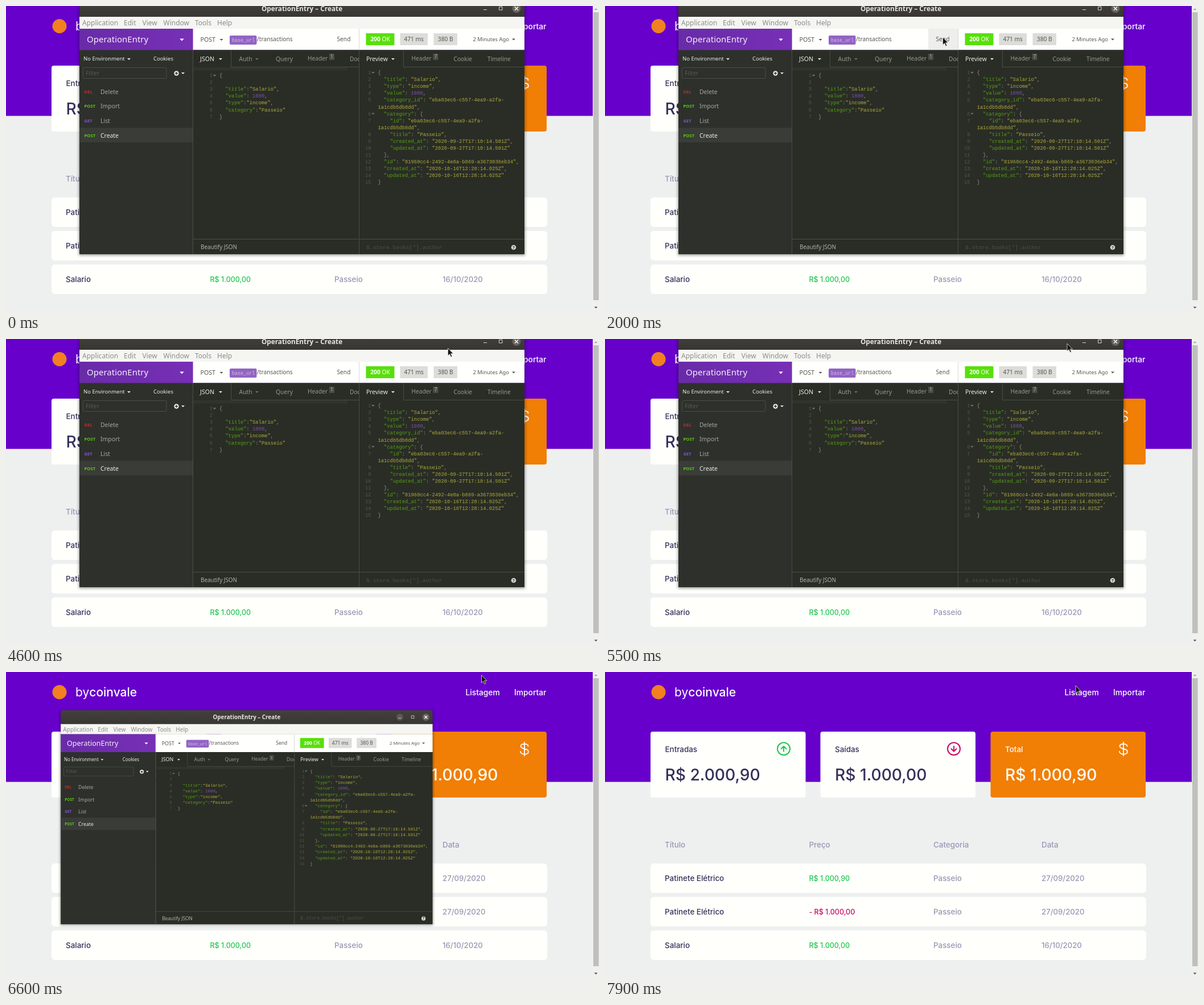
An HTML page that plays this animation: 1042x537 px, repeating every 8 s.

```html
<!DOCTYPE html>
<html lang="pt">
<head>
<meta charset="utf-8">
<title>Finance dashboard</title>
<style>
html, body { margin: 0; width: 100%; height: 100%; overflow: hidden; background: #eef0f0; }
svg { display: block; width: 1042px; height: 537px; }
text { white-space: pre; }
.page { font-family: Inter, "Open Sans", sans-serif; font-weight: 500; }
.ui { font-family: "Noto Sans", "Open Sans", sans-serif; }
.mono { font-family: "Liberation Mono", "DejaVu Sans Mono", monospace; }
</style>
</head>
<body>
<svg id="stage" viewBox="0 0 1042 537">
  <defs>
    <linearGradient id="bar" x1="0" y1="0" x2="0" y2="1">
      <stop offset="0" stop-color="#43413c"/><stop offset="1" stop-color="#373632"/>
    </linearGradient>
    <linearGradient id="brand">
      <stop offset="0" stop-color="#692ba8"/><stop offset="1" stop-color="#772fb6"/>
    </linearGradient>
    <filter id="soft" x="-5%" y="-5%" width="110%" height="112%"><feGaussianBlur stdDeviation="2.5"/></filter>
  </defs>
  <g id="page"></g>
  <g id="win"></g>
  <path id="cursor" d="M0 0V13.5L3.1 10.6L5.3 15.6L7.4 14.7L5.2 9.8H9.4Z" fill="#141414" stroke="#e4e4e4" stroke-width=".8"/>
</svg>
<script>
const $ = id => document.getElementById(id);

const rect = (x, y, w, h, fill, extra = '') =>
  `<rect x="${x}" y="${y}" width="${w}" height="${h}" fill="${fill}" ${extra}/>`;
const path = (d, color, width, extra = '') =>
  `<path d="${d}" fill="none" stroke="${color}" stroke-width="${width}" ${extra}/>`;
// y is the vertical middle of the capitals
const label = (cls, size) => (x, y, str, fill, extra = '', s = size) =>
  `<text class="${cls}" x="${x}" y="${(y + s * .36).toFixed(1)}" font-size="${s}" fill="${fill}" ${extra}>${str}</text>`;
const pageText = label('page', 13.4);
const ui = label('ui', 10.2);
const mono = label('mono', 8.8);
const caret = (x, y, fill, r = 3) => `<path d="M${x - r} ${y - r / 2}h${2 * r}l${-r} ${r}z" fill="${fill}"/>`;

function drawPage() {
  const ink = '#35315a', gray = '#9896b4', green = '#20c650', red = '#cc0862', paper = '#fffffc';
  const cols = [105, 358.5, 577, 767];
  const round = 'stroke-linecap="round" stroke-linejoin="round"';
  const arrowIcon = (x, color, dir) =>
    `<circle cx="${x}" cy="135.3" r="11" fill="none" stroke="${color}" stroke-width="2"/>` +
    path(`M${x} ${135.3 + 4.5 * dir}V${135.3 - 4.5 * dir}m-4.5 ${4.5 * dir}l4.5 ${-4.5 * dir}l4.5 ${4.5 * dir}`, color, 2, round);
  const card = (x, title, sum, fill, color) =>
    rect(x, 105, 272.5, 116, fill, 'rx="4"') +
    pageText(x + 25.5, 136, title, color) +
    pageText(x + 25.5, 181, sum, color, '', 28.2);
  const row = (y, title, price, color, date) =>
    rect(80, y - 26, 871, 52, paper, 'rx="6"') +
    pageText(cols[0], y, title, ink) +
    pageText(cols[1], y, price, color, 'font-weight="600"', 12.5) +
    pageText(cols[2], y, 'Passeio', gray) +
    pageText(cols[3], y, date, gray, '', 13.2);

  $('page').innerHTML =
    rect(0, 0, 1042, 537, '#eef0f0') +
    rect(0, 0, 1031, 193.5, '#6700cb') +
    '<circle cx="94" cy="35.5" r="12.5" fill="#f28022"/>' +
    pageText(122, 35, '<tspan font-weight="400">by</tspan>coinvale', '#fff', '', 21) +
    pageText(807.5, 36, 'Listagem', '#fff', '', 13.8) +
    pageText(893, 36, 'Importar', '#fff', '', 13.8) +
    card(80, 'Entradas', 'R$ 2.000,90', paper, ink) + arrowIcon(314, green, 1) +
    card(378.5, 'Saídas', 'R$ 1.000,00', paper, ink) + arrowIcon(613, red, -1) +
    card(677.5, 'Total', 'R$ 1.000,90', '#f17e05', '#fff') +
    path('M911 123.5V147.5M917.5 130.5C917.5 125.5 904.5 125 904.5 130.5C904.5 137 918 133.5 918 140.5C918 146.5 904 146 904 140', '#fff', 1.8, round) +
    ['Título', 'Preço', 'Categoria', 'Data'].map((s, i) => pageText(cols[i], 304.5, s, gray)).join('') +
    row(363, 'Patinete Elétrico', 'R$ 1.000,90', green, '27/09/2020') +
    row(422, 'Patinete Elétrico', '- R$ 1.000,00', red, '27/09/2020') +
    row(481, 'Salario', 'R$ 1.000,00', green, '16/10/2020') +
    rect(1031, 0, 11, 537, '#f0f0ef') +
    rect(1032, 11, 9.5, 507, '#bfbfbd') +
    caret(1036.5, 531, '#505050') +
    '<path d="M1033.5 7h6l-3 -3z" fill="#a5a5a5"/>';
}

// Colours keys, strings and numbers of one line of JSON
const paint = line => line.replace(/"[^"]*"(?=:)|"[^"]*"?|^[0-9a-f]{12}"|\b\d+\b/g, (s, at, all) => {
  const isKey = all[at + s.length] === ':';
  const color = isKey ? '#54a012' : s.includes('"') ? '#aeab3c' : '#7d4fb8';
  return `<tspan fill='${color}'>${s}</tspan>`;
});

// A line starting with "~" is a wrapped one and has no number
function editor(x, y, lines) {
  let n = 0;
  return lines.map((line, i) => {
    const cy = y + i * 12.06, wrapped = line[0] === '~';
    const number = wrapped ? '' : mono(x - 12, cy, ++n, '#53554e', 'text-anchor="end"');
    const fold = /{$/.test(line) ? caret(x - 8.5, cy + .5, '#74766e', 2.8) : '';
    return number + fold + mono(x, cy, paint(wrapped ? line.slice(1) : line), '#92938a');
  }).join('');
}

function drawWindow() {
  const dark = '#2a2d26', edge = '#4b4d47', dim = '#96978f', lit = '#ecece8', text = '#555550';
  const request = (y, method, color, name, fill = '#a6a7a1') =>
    ui(137.5, y, method, color, 'font-weight="600"', 7.7) + ui(166, y, name, fill, '', 10.4);
  const chip = (x, w, str) =>
    rect(x, 48, w, 21, '#dcdcd9') + ui(x + w / 2, 58.5, str, text, 'text-anchor="middle"');
  const badge = (x, str) =>
    rect(x - 4.5, 84, 9, 11, '#4b4d47') + ui(x, 89.5, str, '#b8b8b2', 'text-anchor="middle"', 8);
  const line = d => path(d, edge, 1);

  $('win').innerHTML =
    rect(128, -8, 784, 447, '#000', 'opacity=".4" filter="url(#soft)"') +
    // title bar and menu
    '<path d="M129 20V-4q0 -6 6 -6H905q6 0 6 6V20z" fill="url(#bar)"/>' +
    ui(520, 4.5, 'OperationEntry – Create', '#e6e4df', 'text-anchor="middle" font-weight="700"', 11.8) +
    '<circle id="minHover" cx="842" cy="4.5" r="7"/>' +
    path('M839 6.5h6', '#d8d6d0', 1) +
    path('M866.5 1.5h5.5v5.5h-5.5z', '#d8d6d0', 1) +
    '<circle cx="897" cy="4.5" r="7.5" fill="#66645f"/>' +
    path('M894 1.5l6 6m0 -6l-6 6', '#fff', 1.5) +
    rect(129, 19, 782, 21, '#f5f5f2') +
    [[134, 'Application'], [207, 'Edit'], [239.5, 'View'], [276.5, 'Window'], [332, 'Tools'], [371, 'Help']]
      .map(([x, s]) => ui(x, 30, s, '#8c8c88', '', 12)).join('') +
    // sidebar
    rect(129, 77, 200, 360, '#2e302c') +
    rect(129, 40, 199.5, 37.5, 'url(#brand)') +
    rect(129, 40, 199.5, 37.5, '#5b1f99', 'id="brandHover"') +
    ui(142, 58.5, 'OperationEntry', '#f4eefa', '', 15) +
    caret(309, 59.5, '#fff', 3.8) +
    ui(136, 92.5, 'No Environment', lit, '', 9.5) + caret(216, 93.5, lit) +
    ui(259, 92.5, 'Cookies', lit, '', 9.5) +
    rect(135.5, 108.5, 146.5, 19, 'none', `stroke="${edge}" rx="2"`) +
    ui(140, 118, 'Filter', '#575953') +
    `<circle cx="299.5" cy="118.5" r="4.2" fill="${lit}"/>` + path('M297 118.5h5m-2.5 -2.5v5', dark, 1.3) +
    caret(311, 118.5, lit) +
    rect(129, 214.5, 199.5, 25.5, '#3a3c38') +
    request(151, 'DEL', '#bd2f2b', 'Delete') +
    request(176.5, 'POST', '#5ccb12', 'Import') +
    request(202, 'GET', '#8352cc', 'List') +
    request(228, 'POST', '#5ccb12', 'Create', lit) +
    // request pane
    rect(328.5, 40, 292, 37.5, '#fffffd') +
    rect(568, 40, 52.5, 37.5, '#eeefec', 'id="sendHover"') +
    ui(341.5, 59, 'POST', text, '', 10.6) + caret(378.5, 59.5, text) +
    rect(393, 52, 47.5, 16, '#9264c4', 'rx="2"') +
    mono(397, 60, 'base_url', '#d3bde8', '', 8.4) +
    ui(441, 58.5, '/transactions', text) +
    ui(581.5, 58.5, 'Send', text) +
    rect(329, 77.5, 291.5, 359.5, dark) +
    rect(329, 108, 271, 5.5, '#31342d') +
    ui(341, 93, 'JSON', lit, '', 10.6) + caret(377, 93.5, lit) +
    ui(409.5, 93, 'Auth', dim, '', 10.4) + caret(441, 93.5, '#70716b') +
    ui(474, 93, 'Query', dim, '', 10.4) +
    ui(530, 92, 'Header', dim) + badge(572.5, '1') +
    ui(604, 93, 'Docs', dim) +
    editor(375, 122, ['{', '', '  "title":"Salario",', '  "value": 1000,', '  "type":"income",', '  "category":"Passeio"', '}']) +
    ui(342, 424.5, 'Beautify JSON', '#b0b1aa', '', 9.9) +
    line('M395.5 78V107.5H620M329 410.5H620M328.5 78V437') +
    // response pane
    rect(620.5, 40, 290.5, 37.5, '#fffffd') +
    rect(632.5, 48, 50, 21, '#58df0c') +
    ui(657.5, 58.5, '<tspan font-weight="700">200</tspan> OK', '#fff', 'text-anchor="middle"') +
    chip(692.5, 48.5, '471 ms') + chip(751.5, 41.5, '380 B') +
    ui(820.5, 58.5, '2 Minutes Ago', text, '', 9.4) + caret(892, 59, text) +
    rect(620.5, 77.5, 290.5, 359.5, dark) +
    ui(633, 93, 'Preview', lit, '', 10.4) + caret(680, 93.5, lit) +
    ui(712.5, 92, 'Header', dim) + badge(755, '7') +
    ui(786.5, 93, 'Cookie', dim) + ui(846, 93, 'Timeline', dim) +
    editor(653.5, 117, [
      '{', '  "title": "Salario",', '  "type": "income",', '  "value": 1000,',
      '  "category_id": "eba03ec6-c557-4ea9-a2fa-', '~1a1cdb5db8dd",',
      '  "category": {', '    "id": "eba03ec6-c557-4ea9-a2fa-', '~1a1cdb5db8dd",',
      '    "title": "Passeio",',
      '    "created_at": "2020-09-27T17:10:14.501Z",', '    "updated_at": "2020-09-27T17:10:14.501Z"',
      '  },', '  "id": "81960cc4-2492-4e8a-b869-a3673036eb34",',
      '  "created_at": "2020-10-16T12:28:14.025Z",', '  "updated_at": "2020-10-16T12:28:14.025Z"', '}'
    ]) +
    mono(633, 424, '$.store.books[*].author', '#4c4e47', '', 9.7) +
    '<circle cx="892" cy="425" r="4.3" fill="#d4d4ce"/>' +
    ui(892, 425, '?', dark, 'text-anchor="middle" font-weight="700"', 7.5) +
    line('M698.5 78V107.5H911M621 410.5H911M620.5 78V437') +
    path('M620.5 40V77', '#d8d8d4', 1);
}

// Pointer: time in ms and tip; off the stage where it is not seen
const away = -50;
const pointer = [
  [0, away, away],
  [900, 262, 88], [1000, 300, 70], [1100, 368, 52], [1200, 475, 36], [1300, away, away],
  [1500, 616, 2], [1600, 587, 38], [1700, 593.5, 55],
  [3600, 580, 52], [3700, 567, 44], [3800, 562, 40], [3900, 569, 42], [4000, 580, 46],
  [4200, 592, 44], [4300, 630, 36], [4400, 690, 26], [4500, 752, 18], [4600, 776.5, 16],
  [5300, 788, 12], [5400, 803, 9], [5500, 812, 8],
  [5700, 824, 3], [5800, 835.5, 5.5],
  [7400, 836, 5.5], [7600, 836, 6.5], [7800, 832, 15], [7900, 827, 24]
];
const show = (id, on) => $(id).setAttribute('visibility', on ? 'inherit' : 'hidden');

function render(t) {
  const [, x, y] = pointer.findLast(p => p[0] <= t);
  const inBar = y >= 40 && y < 77;
  $('cursor').setAttribute('transform', `translate(${x} ${y})`);
  show('brandHover', inBar && x > 129 && x < 328);
  show('sendHover', inBar && x >= 568 && x < 620);
  show('minHover', t >= 5800);
  $('minHover').setAttribute('fill', t >= 6300 ? '#5b5954' : '#504e49');
  $('win').setAttribute('transform', t >= 6600 ? 'matrix(.8355 0 0 .843 -11.6 75.7)' : '');
  show('win', t < 7000);
}

drawPage();
drawWindow();
(function tick() {
  render(performance.now() % 8000);
  requestAnimationFrame(tick);
})();
</script>
</body>
</html>
```
